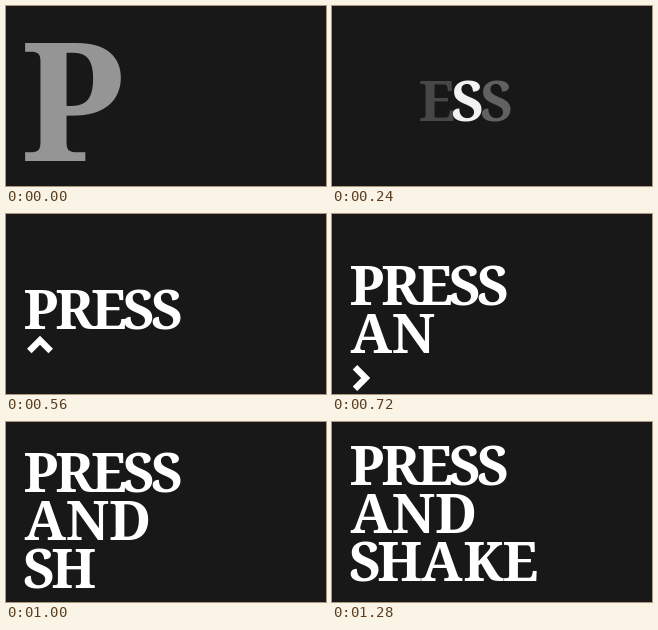
An HTML page with a canvas for the animation above (1920 ms loop, 320 by 180 pixels).

```html
<!DOCTYPE html>
<html lang="en">
<head>
<meta charset="utf-8">
<title>Press and shake</title>
<style>
  html, body { margin: 0; height: 100%; overflow: hidden; background: #181818; }
  canvas { display: block; }
</style>
</head>
<body>
<canvas id="stage" width="320" height="180"></canvas>
<script>
const ctx = document.getElementById('stage').getContext('2d');
const LOOP = 1920, STEP = 40, SETTLED = 1280;
const LEFT = 19, GAP = 1.25, CAP = 39.5, LEADING = 48;
const inkWidth = { P: 32, R: 35, E: 29, S: 27, A: 41, N: 41, D: 40, H: 41, K: 41 };
const lines = [
  { text: 'PRESS', start: 340, pace: 50 },
  { text: 'AND', start: 600, pace: 65 },
  { text: 'SHAKE', start: 900, pace: 65 },
];

const clamp = v => Math.min(1, Math.max(0, v));
const mix = (a, b, u) => a + (b - a) * u;
const easeOut = u => 1 - (1 - clamp(u)) ** 3;
const settle = (t, start, tau) => t < start ? 0 : 1 - Math.exp((start - t) / tau);

// Each letter sits centred by its ink in a fixed slot.
function drawLine(text, top, alphaOf) {
  let x = LEFT;
  [...text].forEach((letter, i) => {
    const m = ctx.measureText(letter);
    const ink = m.actualBoundingBoxLeft + m.actualBoundingBoxRight;
    ctx.globalAlpha = alphaOf(i);
    ctx.fillText(letter, x + (inkWidth[letter] - ink) / 2 + m.actualBoundingBoxLeft, top + CAP);
    x += inkWidth[letter] + GAP;
  });
  ctx.globalAlpha = 1;
}

// The word shrinks into place while a flash runs across its letters.
function drawFlash(t) {
  const scale = 1 + 2 * Math.exp(-t / 55);
  ctx.save();
  ctx.translate(LEFT, 94.5);
  ctx.scale(scale, scale);
  ctx.translate(-LEFT, -94.5);
  drawLine('PRESS', 75, i => clamp(1 - Math.abs(t - 40 - 65 * i) / 88));
  ctx.restore();
}

function drawChevron(t) {
  if (t < 340 || t >= 900) return;
  const rise = clamp((t - 360) / 200) ** 2;
  const turn = easeOut((t - 560) / 140);
  ctx.save();
  ctx.translate(mix(34, 29.5, turn), mix(mix(162, 130.5, rise), 164, turn));
  ctx.rotate(turn * Math.PI / 2);
  ctx.beginPath();
  ctx.moveTo(-10.7, 6.5);
  ctx.lineTo(0, -4.2);
  ctx.lineTo(10.7, 6.5);
  ctx.stroke();
  ctx.restore();
}

function draw(t) {
  ctx.fillStyle = '#181818';
  ctx.fillRect(0, 0, 320, 180);
  ctx.fillStyle = ctx.strokeStyle = '#fff';
  ctx.lineWidth = 6.4;
  ctx.font = '600 55px "Noto Serif", serif';
  ctx.fontStretch = 'semi-condensed';

  if (t < 340) drawFlash(t);
  const top = 75 - 28 * settle(t, 560, 85) - 24 * settle(t, 895, 85);
  lines.forEach(({ text, start, pace }, row) =>
    drawLine(text, top + row * LEADING, i => t >= start + i * pace ? 1 : 0));
  drawChevron(t);
}

function tick() {
  const t = performance.now() % LOOP;
  draw(Math.min(SETTLED, Math.floor(t / STEP) * STEP));
  requestAnimationFrame(tick);
}
tick();
</script>
</body>
</html>
```
